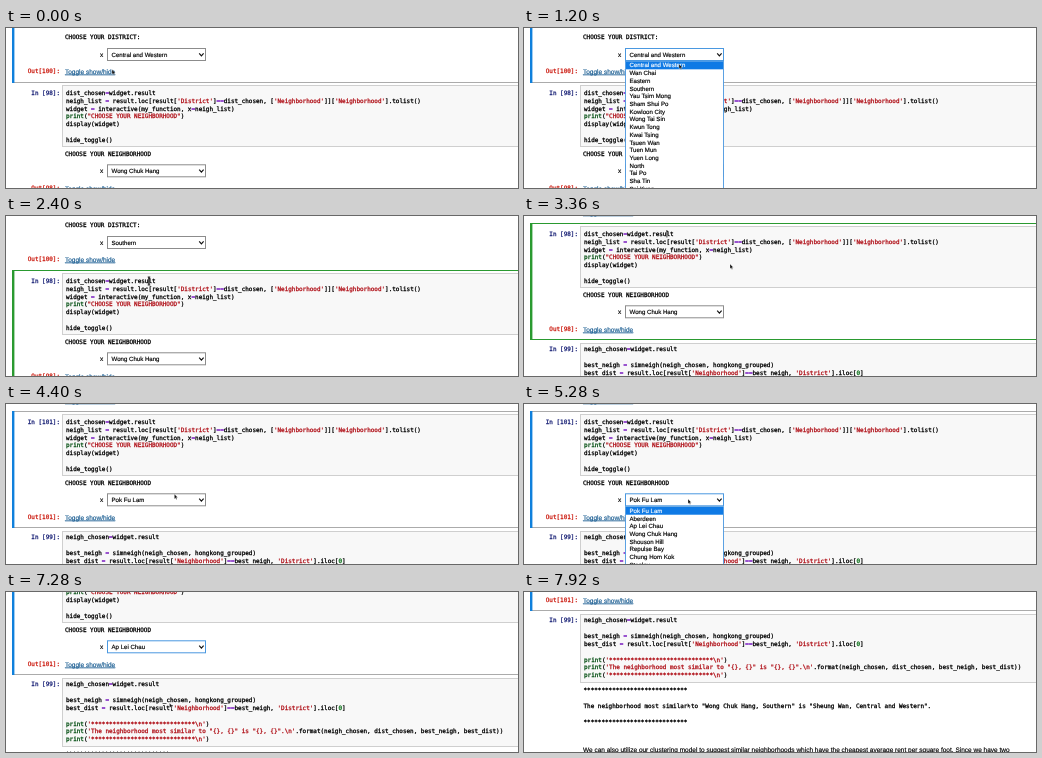
Recreate the animation shown at these times as an HTML page. Size 512 by 160 pixels, loop 8000 ms.

```html
<!DOCTYPE html>
<html lang="en">
<head>
<meta charset="utf-8">
<title>Notebook widgets</title>
<style>
html, body { margin: 0; width: 100%; height: 100%; overflow: hidden; background: #fff; }
svg { display: block; width: 100vw; height: 100vh; }
text { white-space: pre; text-rendering: geometricPrecision; color: #000; }
text, tspan { fill: currentColor; stroke: currentColor; stroke-width: .28; }
.mono { font: 5.96px "DejaVu Sans Mono", "Liberation Mono", monospace; }
.sans { font: 6.5px "Liberation Sans", Arial, sans-serif; }
.small { font: 6.1px "Liberation Sans", Arial, sans-serif; }
.sans, .small { stroke-width: .16; }
.in { color: #1c2478; text-anchor: end; }
.out { color: #cc1f14; text-anchor: end; }
.link { color: #14598f; text-decoration: underline; }
.str { color: #b01018; }
.fn { color: #004d10; }
.num { color: #006a10; }
.op { color: #7a1cc0; }
</style>
</head>
<body>
<svg id="stage" viewBox="0 0 512 160"></svg>
<script>
const LOOP = 8000, STEP = 80, ROW = 7.72, LINE = 7.9, CHAR = 3.588;
const BLUE = '#0f80dc', GREEN = '#2a9a30', FOCUS = '#4a98e0', PICK = '#0f7ae5';
const stage = document.getElementById('stage');

function el(tag, attrs, parent) {
  const node = document.createElementNS('http://www.w3.org/2000/svg', tag);
  set(node, attrs);
  return parent.appendChild(node);
}
function set(node, attrs) {
  for (const key in attrs) node.setAttribute(key, attrs[key]);
}
function show(node, on) {
  node.style.display = on ? '' : 'none';
}
// y is the middle of the lowercase letters
function label(str, x, y, cls, parent) {
  const node = el('text', { x, y: y + 2, class: cls }, parent);
  node.textContent = str;
  return node;
}

const page = el('g', {}, stage);

function codeBox(top, bottom, firstLine, lines) {
  el('rect', { x: 56.5, y: top + .5, width: 480, height: bottom - top, fill: '#f8f8f8', stroke: '#cfcfcf' }, page);
  const token = /('[^']*'|"[^"]*")|(print(?=\())|(==|=)|(\b\d+\b)/g;
  const kinds = ['str', 'fn', 'op', 'num'];
  lines.forEach((line, i) => {
    const node = label('', 60, firstLine + i * LINE, 'mono', page);
    let last = 0;
    const span = (str, cls) => {
      if (str) el('tspan', cls ? { class: cls } : {}, node).textContent = str;
    };
    for (const m of line.matchAll(token)) {
      span(line.slice(last, m.index));
      span(m[0], kinds[m.slice(1).findIndex(Boolean)]);
      last = m.index + m[0].length;
    }
    span(line.slice(last));
  });
}

function select(y) {
  label('x', 94, y, 'sans', page);
  const box = el('rect', { x: 101.5, y: y - 6.5, width: 98, height: 12, fill: '#fff' }, page);
  const text = label('', 105.5, y, 'small', page);
  el('path', { d: `M193.2 ${y - 1.6}l2.2 2.4 2.2-2.4`, fill: 'none', stroke: '#111', 'stroke-width': 1.2 }, page);
  return { box, text };
}

function menu(top, items) {
  const group = el('g', {}, page);
  const height = items.length * ROW + 1;
  el('rect', { x: 101.5, y: top, width: 98, height, fill: '#fff', stroke: FOCUS, 'stroke-width': .9 }, group);
  const bar = el('rect', { x: 102, width: 97, height: ROW, fill: PICK }, group);
  const rows = items.map((item, i) => label(item, 105.5, top + 4.1 + i * ROW, 'small', group));
  return { group, bar, rows, top, items };
}
function drawMenu(m, open, row) {
  show(m.group, open);
  set(m.bar, { y: m.top + .3 + row * ROW });
  m.rows.forEach((node, i) => { node.style.color = i === row ? '#fff' : '#000'; });
}

const stars = '*'.repeat(29);

// First cell: district widget
label('CHOOSE YOUR DISTRICT:', 59, 9, 'mono', page);
const district = select(27);
label('Out[100]:', 54, 43, 'mono out', page);
label('Toggle show/hide', 59, 43.5, 'sans link', page);

// Second cell: neighborhood widget
codeBox(57, 118, 64.7, [
  'dist_chosen=widget.result',
  "neigh_list = result.loc[result['District']==dist_chosen, ['Neighborhood']]['Neighborhood'].tolist()",
  'widget = interactive(my_function, x=neigh_list)',
  'print("CHOOSE YOUR NEIGHBORHOOD")',
  'display(widget)',
  '',
  'hide_toggle()'
]);
const inPrompt = label('', 54, 64.5, 'mono in', page);
label('CHOOSE YOUR NEIGHBORHOOD', 59, 126, 'mono', page);
const hood = select(143.3);
const outPrompt = label('', 54, 160, 'mono out', page);
label('Toggle show/hide', 59, 160.5, 'sans link', page);

// Third cell: printed result
codeBox(174, 242, 180, [
  'neigh_chosen=widget.result',
  '',
  'best_neigh = simneigh(neigh_chosen, hongkong_grouped)',
  "best_dist = result.loc[result['Neighborhood']==best_neigh, 'District'].iloc[0]",
  '',
  `print('${stars}\\n')`,
  `print('The neighborhood most similar to "{}, {}" is "{}, {}".\\n'.format(neigh_chosen, dist_chosen, best_neigh, best_dist))`,
  `print('${stars}\\n')`
]);
label('In [99]:', 54, 180, 'mono in', page);
[stars, '', 'The neighborhood most similar to "Wong Chuk Hang, Southern" is "Sheung Wan, Central and Western".', '', stars]
  .forEach((line, i) => label(line, 59.5, 250 + i * LINE, 'mono', page));
label('We can also utilize our clustering model to suggest similar neighborhoods which have the cheapest average rent per square foot. Since we have two',
  59, 310, 'sans', page);

const frame = el('rect', { x: 6.5, width: 520, fill: 'none' }, page);
const edge = el('rect', { x: 6, width: 2.4 }, page);
const caret = el('rect', { x: 60 + 23 * CHAR, y: 61, width: .8, height: 7.5 }, page);

const districts = menu(33.3, ['Central and Western', 'Wan Chai', 'Eastern', 'Southern', 'Yau Tsim Mong',
  'Sham Shui Po', 'Kowloon City', 'Wong Tai Sin', 'Kwun Tong', 'Kwai Tsing', 'Tsuen Wan', 'Tuen Mun',
  'Yuen Long', 'North', 'Tai Po', 'Sha Tin', 'Sai Kung', 'Islands']);
const hoods = menu(149.7, ['Pok Fu Lam', 'Aberdeen', 'Ap Lei Chau', 'Wong Chuk Hang', 'Shouson Hill',
  'Repulse Bay', 'Chung Hom Kok', 'Stanley']);

const arrow = el('path', { d: 'M0 0V4.8L1.1 3.8 1.9 5.5 2.7 5.1 1.9 3.5H3.4z', fill: '#111', stroke: '#fff', 'stroke-width': .3 }, stage);
const beam = el('path', { d: 'M-1.3-4H1.3M0-4V4M-1.3 4H1.3', fill: 'none', stroke: '#111', 'stroke-width': .9 }, stage);

// [time, x, y] and [time, scroll]
const pointer = [[0, 106, 41.5], [160, 106, 41.5], [640, 150, 28], [960, 150, 28], [1120, 155, 36], [1360, 155, 36],
  [1680, 132, 59], [1920, 132, 59], [2240, 143, 65], [2480, 143, 65], [2880, 206, 48], [3760, 206, 48],
  [4560, 164, 95], [5600, 164, 95], [6240, 166, 122], [6800, 166, 122], [7200, 163.5, 111], [8000, 163.5, 111]];
const scroll = [[0, 0], [2720, 0], [3120, 47], [7040, 47], [7600, 152], [8000, 152]];

function at(keys, t) {
  const i = Math.max(1, keys.findIndex(k => k[0] > t));
  const a = keys[i - 1], b = keys[i];
  const p = (t - a[0]) / (b[0] - a[0]);
  const ease = p * p * (3 - 2 * p);
  return a.slice(1).map((v, n) => v + (b[n + 1] - v) * ease);
}

function draw(t) {
  const [x, y] = at(pointer, t);
  const top = Math.round(at(scroll, t)[0]);
  const within = (from, to) => t >= from && t < to;
  const hover = m => {
    const row = Math.floor((y + top - m.top) / ROW);
    return Math.max(0, Math.min(row, m.items.length - 1));
  };
  set(page, { transform: `translate(0 ${-top})` });

  district.text.textContent = t < 1840 ? 'Central and Western' : 'Southern';
  hood.text.textContent = t < 3920 ? 'Wong Chuk Hang' : t < 6720 ? 'Pok Fu Lam' : 'Ap Lei Chau';
  set(district.box, { stroke: within(880, 2240) ? FOCUS : '#8c8c8c' });
  set(hood.box, { stroke: t >= 4800 ? FOCUS : '#8c8c8c' });
  drawMenu(districts, within(880, 1840), hover(districts));
  drawMenu(hoods, within(4800, 6720), hover(hoods));

  inPrompt.textContent = t < 3680 ? 'In [98]:' : t < 3920 ? 'In [*]:' : 'In [101]:';
  outPrompt.textContent = t < 3920 ? 'Out[98]:' : 'Out[101]:';

  const editing = within(2240, 3680);
  const [y0, y1] = t < 2240 ? [-60, 54] : [54, 170];
  set(frame, { y: y0 + .5, height: y1 - y0, stroke: editing ? GREEN : '#ababab' });
  set(edge, { y: y0, height: y1 - y0 + 1, fill: editing ? GREEN : BLUE });
  show(caret, editing && (t - 2240) % 1060 < 530);

  const overCode = within(2160, 2640);
  show(arrow, !overCode);
  show(beam, overCode);
  set(overCode ? beam : arrow, { transform: `translate(${x} ${y})` });
}

const start = performance.now();
function tick() {
  const t = (performance.now() - start) % LOOP;
  draw(Math.floor(t / STEP) * STEP);
  requestAnimationFrame(tick);
}
tick();
</script>
</body>
</html>
```
